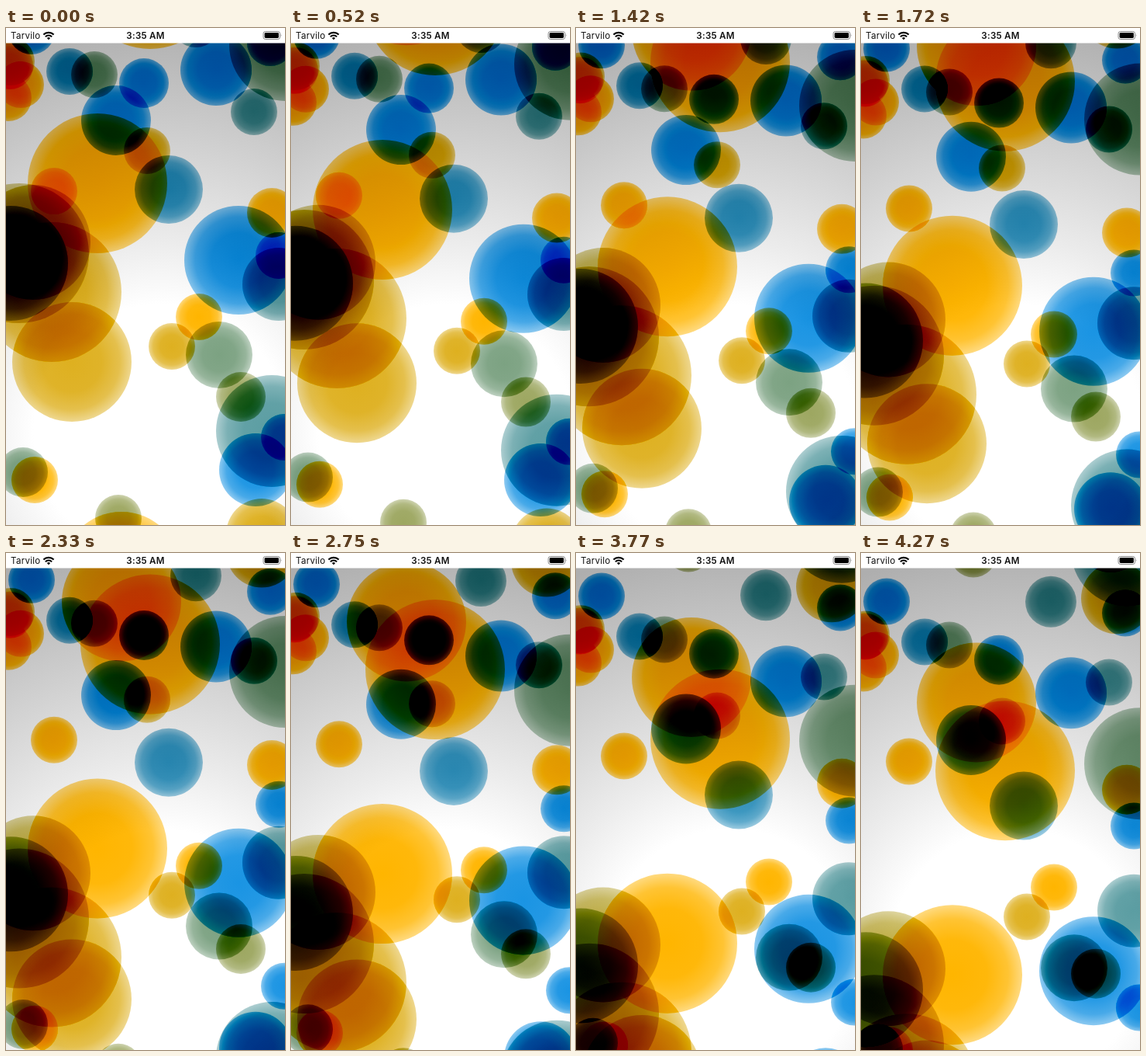
These frames come from a looping animation (360x640 px, 4350 ms). An HTML page with a canvas:

```html
<!DOCTYPE html>
<html lang="en">
<head>
<meta charset="utf-8">
<title>Falling circles</title>
<style>
  html, body { margin: 0; width: 100%; height: 100%; overflow: hidden; background: #fff; }
  canvas, svg { position: absolute; left: 0; top: 0; display: block; }
  text { font: 11.6px Inter, Roboto, sans-serif; fill: #111; letter-spacing: .25px; }
  .clock { font-weight: 600; text-anchor: middle; }
</style>
</head>
<body>
<canvas id="stage" width="360" height="640"></canvas>
<svg width="360" height="20" viewBox="0 0 360 20">
  <rect width="360" height="19.5" fill="#fff"/>
  <text x="6" y="14">Tarvilo</text>
  <g fill="none" stroke="#000" stroke-width="2.1">
    <path d="M48.4 8.6a9.3 9.3 0 0 1 13.2 0"/>
    <path d="M50.9 11.2a5.8 5.8 0 0 1 8.2 0"/>
    <path d="M55 15.2l-2.1-2.2a3 3 0 0 1 4.2 0z" fill="#000" stroke="none"/>
  </g>
  <text class="clock" x="180" y="14">3:35 AM</text>
  <rect x="332" y="4.5" width="21.5" height="10" rx="2.7" fill="none" stroke="#888"/>
  <rect x="333.6" y="6.1" width="18.3" height="6.8" rx="1.4"/>
  <path d="M354.8 7.7q1.6 1.8 0 3.6z" fill="#888"/>
</svg>
<script>
const W = 360, H = 640, LOOP = 4350;
const FIRST = 18.8, STEP = 101.2;
const YELLOW = [255, 181, 0], BLUE = [26, 148, 227];
const ctx = document.getElementById('stage').getContext('2d');

// Starting points on an even colour ladder from yellow to blue: x, y, radius (30 if left out)
const ladder = [
  [[118, 200, 90], [186, -63, 90], [149, 700, 77], [62, 210], [343, 238, 32],
    [249, 372], [37, 582], [19, 73], [3, 90], [5, 49]],
  [[59, 340, 90], [85, 430, 77], [330, 652, 46], [214, 410], [182, 158], [6, 43, 31]],
  [[17, 290, 90], [35, 276, 74]],
  [[303, 475, 32], [145, 631]],
  [[6, 303, 74], [360, 22, 72], [275, 421, 43], [22, 572, 32], [114, 60]],
  [[343, 519, 72], [352, 330, 47], [245, -8, 33], [320, 108]],
  [[210, 208, 44], [82, 56]],
  [[300, 299, 70], [322, 569, 47], [271, 54, 46], [142, 119, 45], [178, 71, 32],
    [33, 4], [352, 293], [359, 527], [341, 19]],
];

// What a colour takes away from white
const inkAt = mix => YELLOW.map((c, i) => 255 - c - (BLUE[i] - c) * mix).join();

// Larger circles fall faster (px per second)
function speed(r) {
  const d = r - 30;
  return 13.7 + 0.95 * d + 0.0027 * d * d;
}

const circles = ladder.flatMap((rung, i) => {
  const ink = inkAt(i / (ladder.length - 1));
  return rung.map(([x, y, r = 30]) => ({ x, y, r, ink, v: speed(r) }));
});

function radial(x, y, r, stops) {
  const g = ctx.createRadialGradient(x, y, 0, x, y, r);
  for (const [at, color] of stops) g.addColorStop(at, color);
  return g;
}

const shade = radial(200, 520, 530, [[0.31, '#000'], [0.46, '#131313'], [1, '#515151']]);

function cover(mode, fill) {
  ctx.globalCompositeOperation = mode;
  ctx.fillStyle = fill;
  ctx.fillRect(0, 0, W, H);
}

// Linear burn: add the inks to the inverted backdrop, then invert the sum
function draw(sec) {
  cover('source-over', shade);
  ctx.globalCompositeOperation = 'lighter';
  for (const { x, y: y0, r, ink, v } of circles) {
    let y = y0 + v * sec;
    if (y - r > H) y -= H + 2 * r - 12;
    ctx.fillStyle = radial(x, y, r, [
      [0, `rgba(${ink},1)`], [0.5, `rgba(${ink},.96)`],
      [0.8, `rgba(${ink},.8)`], [1, `rgba(${ink},.5)`],
    ]);
    ctx.beginPath();
    ctx.arc(x, y, r, 0, 2 * Math.PI);
    ctx.fill();
  }
  cover('difference', '#fff');
}

const origin = performance.now();
let shown = -1;
function tick() {
  const ms = (performance.now() - origin) % LOOP;
  const step = Math.max(0, Math.floor((ms - FIRST) / STEP));
  if (step !== shown) {
    shown = step;
    draw(step ? (FIRST + step * STEP) / 1000 : 0);
  }
  requestAnimationFrame(tick);
}
tick();
</script>
</body>
</html>
```
